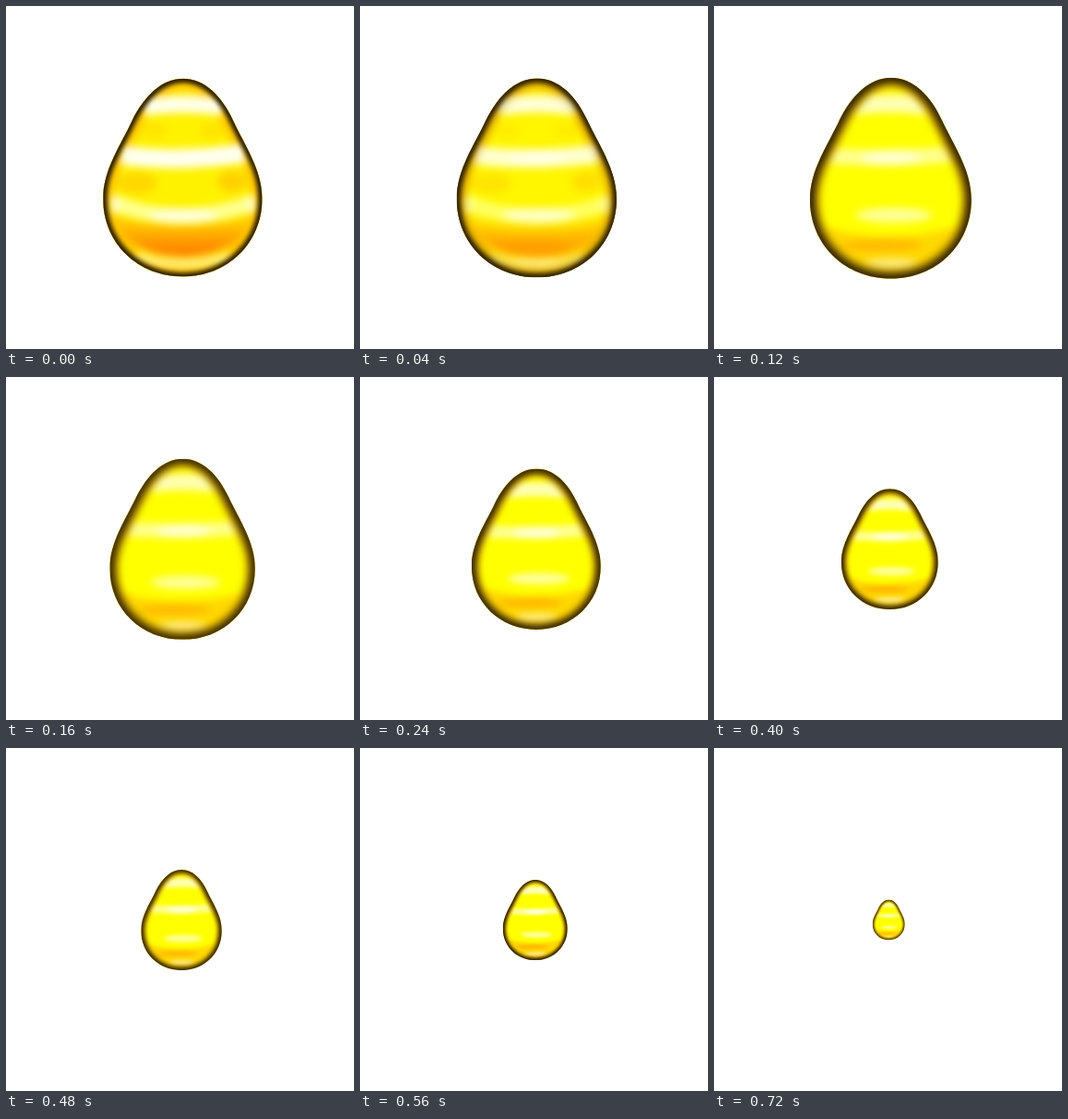
These frames come from a looping animation (377x372 px, 0.76 s). An HTML page:

```html
<!DOCTYPE html>
<html lang="en">
<head>
<meta charset="utf-8">
<title>Shrinking egg</title>
<style>
  html, body { margin: 0; width: 100%; height: 100%; overflow: hidden; background: #fff; }
  svg { display: block; width: 377px; height: 372px; }
  path { fill: none; }
</style>
</head>
<body>
<svg viewBox="0 0 377 372">
  <defs>
    <path id="shape" d="M192 78C216 78 235 98 247 124C259 150 279 178 279 210C279 260 240 296 192 296C143 296 104 260 104 210C104 178 124 150 136 124C149 98 168 78 192 78Z"/>
    <clipPath id="clip"><use href="#shape"/></clipPath>
    <linearGradient id="ember" x2="0" y2="1">
      <stop offset="0" stop-color="#ffe000"/>
      <stop offset=".5" stop-color="#ffa800"/>
      <stop offset="1" stop-color="#ff7800"/>
    </linearGradient>
    <g color-interpolation-filters="sRGB">
      <filter id="soft" filterUnits="userSpaceOnUse" x="70" y="45" width="245" height="285"><feGaussianBlur stdDeviation="4.5"/></filter>
      <filter id="fine" filterUnits="userSpaceOnUse" x="70" y="45" width="245" height="285"><feGaussianBlur stdDeviation="2.6"/></filter>
    </g>
  </defs>

  <g id="egg" clip-path="url(#clip)">
    <g id="calm">
      <rect x="90" y="60" width="200" height="250" fill="#ff0"/>
      <g filter="url(#soft)">
        <path d="M112 236Q150 252 192 249Q240 250 272 236V305H112Z" style="fill:#ffd800"/>
        <ellipse cx="182" cy="260" rx="44" ry="6" fill="#ffb800"/>
        <path d="M150 109Q192 103 232 109" stroke="#ffffb4" stroke-width="19"/>
        <path d="M125 163Q190 167 260 161" stroke="#ffff90" stroke-width="17"/>
        <ellipse cx="192" cy="165" rx="32" ry="8" fill="#ffffd0"/>
        <ellipse cx="195" cy="227" rx="42" ry="8" fill="#ffff98"/>
        <ellipse cx="192" cy="280" rx="30" ry="6" fill="#ffec80"/>
        <use href="#shape" fill="none" stroke="#d8ac00" stroke-width="22"/>
      </g>
      <use href="#shape" fill="none" stroke="#201400" stroke-width="11" filter="url(#soft)"/>
    </g>

    <g id="flash">
      <rect x="90" y="60" width="200" height="250" fill="#fff200"/>
      <g filter="url(#soft)">
        <ellipse cx="160" cy="135" rx="13" ry="9" fill="#ffe400"/>
        <ellipse cx="224" cy="135" rx="13" ry="9" fill="#ffe400"/>
        <ellipse cx="141" cy="193" rx="22" ry="12" fill="#ffd800"/>
        <ellipse cx="246" cy="191" rx="16" ry="12" fill="#ffd200"/>
        <path d="M114 228Q190 252 270 228Q254 274 192 274Q130 274 114 228Z" style="fill:url(#ember)"/>
        <use href="#shape" fill="none" stroke="#ffc400" stroke-width="24"/>
        <path d="M148 109Q192 103 236 109" stroke="#ffffe8" stroke-width="19"/>
        <path d="M124 162Q185 171 260 160" stroke="#fffff0" stroke-width="21"/>
        <path d="M114 214Q190 244 270 214" stroke="#ffff90" stroke-width="17"/>
        <ellipse cx="192" cy="229" rx="38" ry="8" fill="#ffffd8"/>
        <ellipse cx="117" cy="216" rx="5" ry="11" fill="#ffffc8"/>
        <ellipse cx="267" cy="216" rx="5" ry="11" fill="#ffffc8"/>
        <path d="M140 274Q192 290 244 274" stroke="#ffec80" stroke-width="10"/>
      </g>
      <use href="#shape" fill="none" stroke="#241800" stroke-width="9" filter="url(#fine)"/>
    </g>
  </g>
</svg>
<script>
  const egg = document.getElementById('egg');
  const flash = document.getElementById('flash');
  const STEP = 40, LOOP = 760;

  function draw(now) {
    const step = Math.floor((now % LOOP) / STEP);
    const glow = Math.max(0, 1 - step / 3);
    // The glow fades first, then the egg shrinks by 5% per step.
    const scale = step > 3 ? 1.1 - step * 0.05 : 1 - 0.015 * glow;
    const x = 188.7 + 2.7 * scale;
    const y = 186.3 + 0.5 * scale - 0.6 * glow;
    egg.setAttribute('transform', `translate(${x} ${y}) scale(${scale}) translate(-191.5 -187)`);
    flash.setAttribute('opacity', glow);
    requestAnimationFrame(draw);
  }

  draw(0);
</script>
</body>
</html>
```
